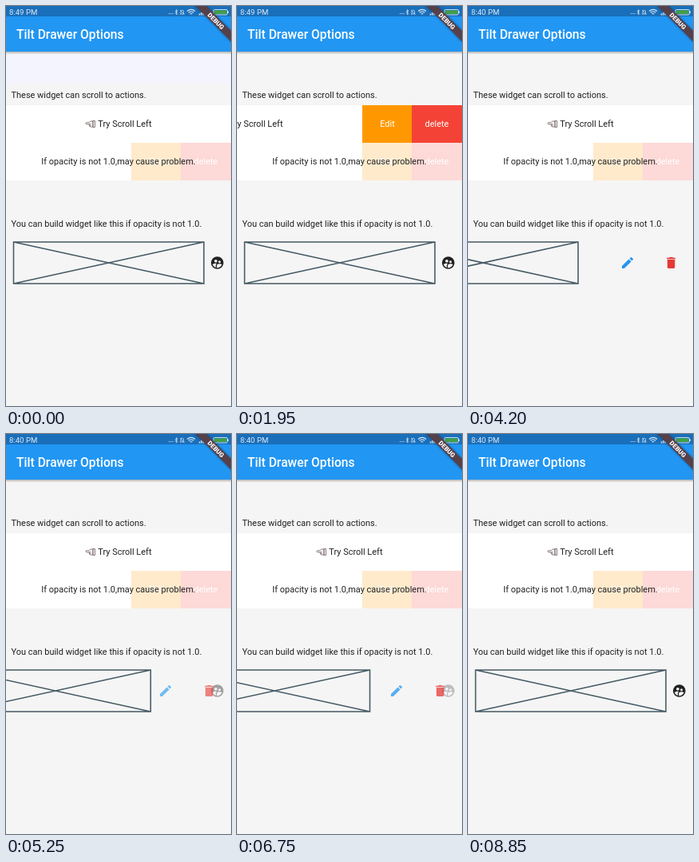
An HTML page that plays this animation: 282 px wide and 500 px high, repeating every 9.15 s.

```html
<!DOCTYPE html>
<html lang="en">
<head>
<meta charset="utf-8">
<title>Swipe rows</title>
<style>
  html, body { margin: 0; width: 100%; height: 100%; overflow: hidden; background: #f5f5f5; }
  svg { display: block; width: 100%; height: 100%; }
  text { font: 10.97px Roboto, sans-serif; fill: #212121; }
  .mid { text-anchor: middle; }
  .action { fill: #fff; text-anchor: middle; }
  .title { font-size: 15.67px; font-weight: 500; fill: #fff; }
  .clock { font-size: 9.6px; fill: #dce9f7; }
  .debug { font-size: 8px; font-weight: 900; fill: #fff; text-anchor: middle; }
  .frame { fill: none; stroke: #455a64; stroke-width: 1.57; }
</style>
</head>
<body>
<svg viewBox="0 0 282 500">
  <defs>
    <linearGradient id="shade" x2="0" y2="1">
      <stop stop-color="#000" stop-opacity=".28"/>
      <stop offset="1" stop-color="#000" stop-opacity="0"/>
    </linearGradient>
    <filter id="soft" x="-30%" y="-60%" width="160%" height="220%"><feGaussianBlur stdDeviation="1.8"/></filter>
    <g id="actions">
      <rect x="157" width="62.5" height="47" fill="#ff9800"/>
      <rect x="219" width="63" height="47" fill="#f44336"/>
      <text class="action" x="188.5" y="27.3">Edit</text>
      <text class="action" x="250.5" y="27.3">delete</text>
    </g>
  </defs>

  <rect width="282" height="500" fill="#f5f5f5"/>
  <rect id="tint" y="60" width="282" height="37" fill="#f3f4fd"/>

  <!-- App bar -->
  <rect y="57" width="282" height="3.5" fill="url(#shade)"/>
  <rect width="282" height="57" fill="#2196f3"/>
  <rect width="282" height="13" fill="#1a6fba"/>
  <text class="title" x="13" y="41">Tilt Drawer Options</text>

  <!-- Status bar -->
  <text class="clock" id="clock" x="4" y="11.3">8:49 PM</text>
  <g fill="none" stroke="#dce9f7" stroke-width=".9">
    <path d="M204 9.5h5.5" stroke-dasharray="1.1 1.1"/>
    <path d="M212 6l3 3.5-1.5 1.5V4.5L215 6l-3 3.5" stroke-width=".7"/>
    <path d="M218 10h5.5M219 10V7a1.8 1.8 0 013.6 0v3M218.2 5l5 5.5" stroke-width=".7"/>
    <path d="M227 6.5q5-4.2 10 0M228.8 8.3q3.2-2.6 6.4 0M230.6 10q1.4-1 2.8 0" stroke-width="1.2"/>
    <path d="M242.5 11.5v-2M244.8 11.5v-3.5M247.1 11.5v-5M249.4 11.5v-7" stroke-width="1.4"/>
    <rect x="260" y="4.5" width="17.5" height="6.5" rx="1.5"/>
    <path d="M278.5 6.5v2.5"/>
  </g>
  <rect x="261" y="5.5" width="15.5" height="4.5" rx=".6" fill="#43a047"/>

  <!-- Swipe rows -->
  <text x="6.5" y="115.3">These widget can scroll to actions.</text>
  <use href="#actions" y="124"/>
  <g id="row">
    <rect y="124" width="282" height="47" fill="#fff"/>
    <g fill="none" stroke="#6b5b5b" stroke-width=".8">
      <path d="M109 144h-3l-1.8 1.7h-3.2a1 1 0 000 2h3.2q-.3 3.3 1.8 3.3h3zM104.2 147.7h2.5M104.6 149.4h2"/>
      <rect x="109" y="143.6" width="2.4" height="7.8"/>
    </g>
    <text x="115.3" y="151.3">Try Scroll Left</text>
  </g>
  <use href="#actions" y="171"/>
  <rect y="171" width="282" height="47" fill="#fff" opacity=".8"/>
  <rect y="171" width="157" height="47" fill="#fff"/>
  <text class="mid" x="141" y="198.3">If opacity is not 1.0,may cause problem.</text>

  <!-- Sliding panel -->
  <text x="6.5" y="276.3">You can build widget like this if opacity is not 1.0.</text>
  <path id="panel" class="frame" d="M9.5 295h238.5v52H9.5zL248 347M248 295L9.5 347"/>
  <g id="people" transform="translate(255.4 311.6) scale(.783)">
    <circle cx="12" cy="12" r="10" fill="#212121"/>
    <g fill="#f5f5f5">
      <circle cx="9.6" cy="9.1" r="2.36"/>
      <circle cx="15.6" cy="10.3" r="1.93"/>
      <path d="M9.6 15.9v3.75c-2.4-.75-4.3-2.6-5.14-4.96 1.05-1.12 3.67-1.69 5.14-1.69q.8 0 1.9.22c-1.64.87-1.9 2.02-1.9 2.68z"/>
      <path d="M12 20l-.8-.04v-4.07c0-1.42 2.94-2.13 4.4-2.13 1.07 0 2.92.39 3.84 1.15C18.27 17.88 15.4 20 12 20z"/>
    </g>
  </g>
  <g id="tools">
    <path transform="translate(190.6 311.6) scale(.783)" fill="#2196f3"
      d="M3 17.25V21h3.75L17.81 9.94l-3.75-3.75zM20.71 7.04a1 1 0 000-1.41l-2.34-2.34a1 1 0 00-1.41 0l-1.83 1.83 3.75 3.75z"/>
    <path transform="translate(245.2 311.6) scale(.783)" fill="#e53935"
      d="M6 19c0 1.1.9 2 2 2h8c1.1 0 2-.9 2-2V7H6zM19 4h-3.5l-1-1h-5l-1 1H5v2h14z"/>
  </g>

  <!-- Corner ribbon -->
  <g transform="translate(282 0) rotate(45)">
    <rect x="-34" y="21.9" width="68" height="9.4" opacity=".45" filter="url(#soft)"/>
    <rect x="-34" y="21.9" width="68" height="9.4" fill="#56404a"/>
    <text class="debug" y="29.5">DEBUG</text>
  </g>
</svg>
<script>
  const LOOP = 9150, STEP = 150;
  const [tint, clock, row, panel, people, tools] =
    ['tint', 'clock', 'row', 'panel', 'people', 'tools'].map(id => document.getElementById(id));

  // Eased 0..1; the first visible move falls on `from`, the last on `to`.
  function ramp(t, from, to) {
    const p = Math.min(1, Math.max(0, (t - from + STEP) / (to - from + STEP)));
    return p * p * (3 - 2 * p);
  }
  const swipe = (t, open, opened, close, closed) => ramp(t, open, opened) - ramp(t, close, closed);
  const shift = (el, x) => el.setAttribute('transform', `translate(${x.toFixed(2)} 0)`);

  function draw(now) {
    const t = Math.floor(Math.max(0, now - start) % LOOP / STEP) * STEP;
    const slide = swipe(t, 3450, 4200, 4950, 5850) + swipe(t, 6300, 7050, 7800, 8250);
    shift(row, -125 * swipe(t, 1050, 1500, 2250, 2850));
    shift(panel, -110 * slide);
    people.style.opacity = 1 - slide;
    tools.style.opacity = slide;
    tint.style.opacity = t < STEP ? 1 : 0;
    clock.textContent = t < 2250 ? '8:49 PM' : '8:40 PM';
    requestAnimationFrame(draw);
  }
  const start = performance.now();
  draw(start);
</script>
</body>
</html>
```
